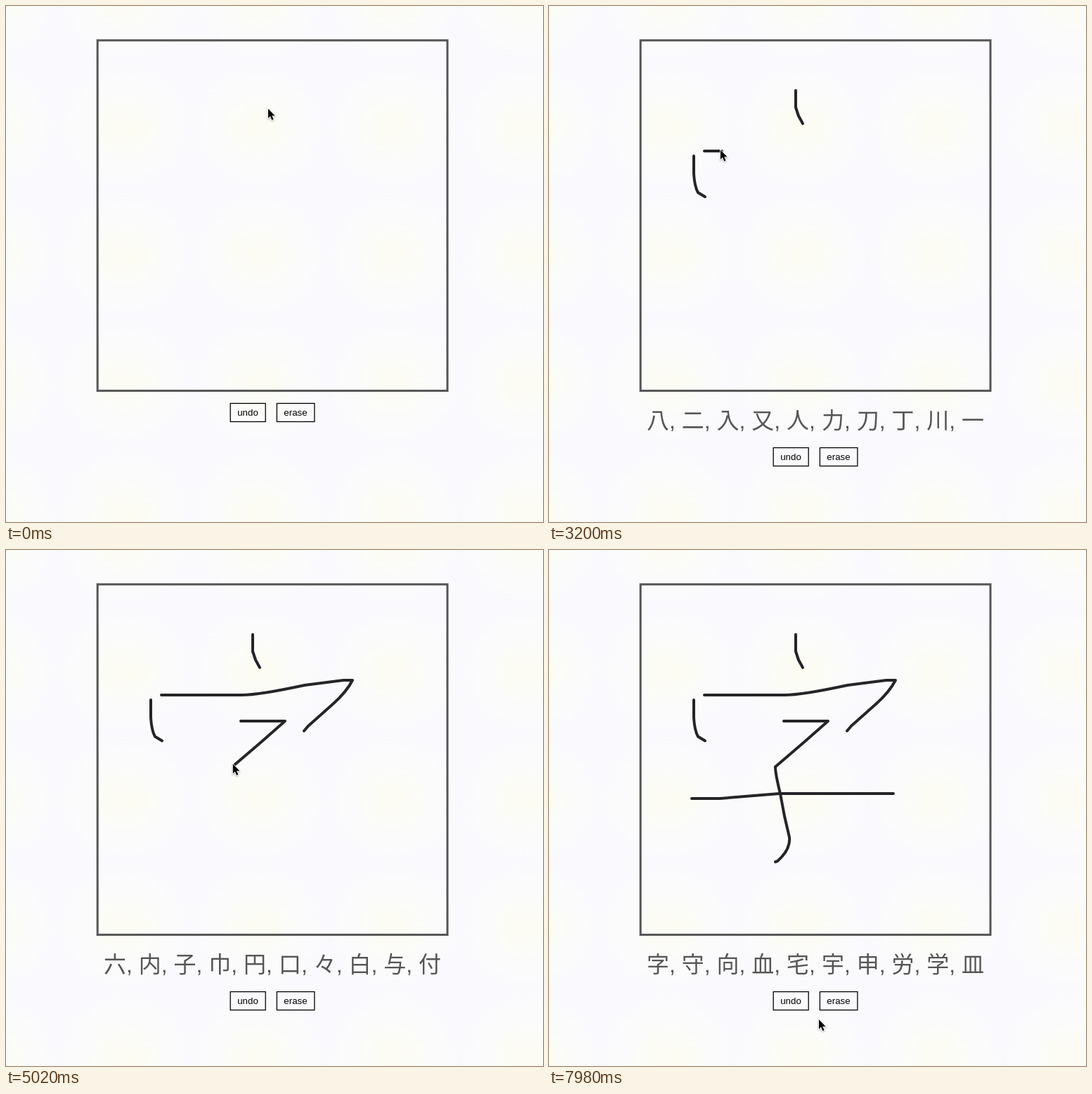
Animation of 764x733 px, one loop 8 s. Source, as an HTML page:

```html
<!DOCTYPE html>
<html lang="en">
<head>
<meta charset="utf-8">
<title>Handwriting lookup</title>
<style>
  html, body { margin: 0; width: 100%; height: 100%; overflow: hidden; }
  body { background: radial-gradient(#fcfcf1, #fbfbfa 50px, #fafafe 95px) 73.5px 81px / 191px 182px; }
  svg { display: block; }
  text { font-family: "Liberation Sans", "Noto Sans CJK JP", "Noto Sans CJK", sans-serif; text-anchor: middle; }
  #buttons { font-size: 13.33px; }
  #buttons rect { fill: none; stroke: #000; stroke-width: 1.3; }
  #ink { fill: none; stroke: #252528; stroke-width: 4; stroke-linecap: round; stroke-linejoin: round; }
  #cursor { stroke: #fff; stroke-width: 1.6; paint-order: stroke; filter: drop-shadow(0 1px 1px #0005); }
</style>
</head>
<body>
<svg width="764" height="733" viewBox="0 0 764 733">
  <rect x="130.2" y="48.8" width="497.8" height="497.8" fill="none" stroke="#555" stroke-width="3"/>
  <text id="matches" x="379" y="600" font-size="32" fill="#555"></text>
  <g id="buttons">
    <rect x="319.2" y="564.5" width="50" height="26"/><text x="344" y="582">undo</text>
    <rect x="385.4" y="564.5" width="53.5" height="26"/><text x="412" y="582">erase</text>
  </g>
  <g id="ink"></g>
  <path id="cursor" d="M0 0V13.4L3 10.6L5.3 16L7.6 15L5.3 9.7H9.6Z"/>
</svg>
<script>
const LOOP = 8000;
const $ = id => document.getElementById(id);

// start, end, pen path, whether it leaves ink
const motions = [
  [20, 420, 'M375 147.5L351 109'],
  [680, 960, 'M351 109V120'],
  [1140, 1380, 'M351 120V141', true],
  [1580, 1760, 'M351 141V144L355 156L361 167', true],
  [1840, 2240, 'M361 167L206 213'],
  [2340, 2594, 'M206 213V238Q207 256 212 265L222 271', true],
  [2680, 3040, 'M222 271L221 206'],
  [3160, 3775, 'M221 206H335Q360 206 425 192L480 185H493Q484 202 466 218L430 250L424 257', true],
  [3880, 4280, 'M424 257L334 243'],
  [4420, 5035, 'M334 243H397L364 272L322 308', true],
  [5150, 5560, 'M322 308Q322 318 329 346L335 378L342 408Q344 425 325 442L322 443', true],
  [5620, 5880, 'M322 443L203 353'],
  [5930, 6360, 'M203 353H243L328 346H490', true],
  [6760, 7300, 'M490 346L452 482'],
  [7400, 7880, 'M452 482Q420 610 386 668.5'],
].map(([start, end, d, inked]) => {
  const path = document.createElementNS('http://www.w3.org/2000/svg', 'path');
  path.setAttribute('d', d);
  if (inked) $('ink').append(path);
  return { start, end, path, inked, length: path.getTotalLength() };
});

const guesses = [
  [0, ''],
  [1860, '一乙八人山川二入三九'],
  [2700, '八二入又人力刀丁川一'],
  [3880, '六内子巾円口々白与付'],
  [5120, '内円予六穴白五元欠牛'],
  [5640, '穴字申白庁皿写宇史守'],
  [6400, '字守向血宅宇申労学皿'],
];

const smooth = f => f * f * (3 - 2 * f);

function draw(t) {
  let pen = motions[0].path.getPointAtLength(0);
  for (const { start, end, path, inked, length } of motions) {
    const started = t >= start;
    const f = Math.min(1, Math.max(0, (t - start) / (end - start)));
    const travelled = length * (inked ? f : smooth(f));
    if (inked) {
      path.style.display = started ? '' : 'none';
      path.style.strokeDasharray = `${travelled} 9999`;
    }
    if (started) pen = path.getPointAtLength(travelled);
  }
  $('cursor').setAttribute('transform', `translate(${pen.x - 2} ${pen.y - 1.5})`);

  const kanji = guesses.findLast(([from]) => t >= from)[1];
  $('matches').textContent = [...kanji].join(', ');
  $('buttons').setAttribute('transform', `translate(0 ${kanji ? 63 : 0})`);
}

const origin = performance.now();
function tick() {
  draw((performance.now() - origin) % LOOP);
  requestAnimationFrame(tick);
}
tick();
</script>
</body>
</html>
```
